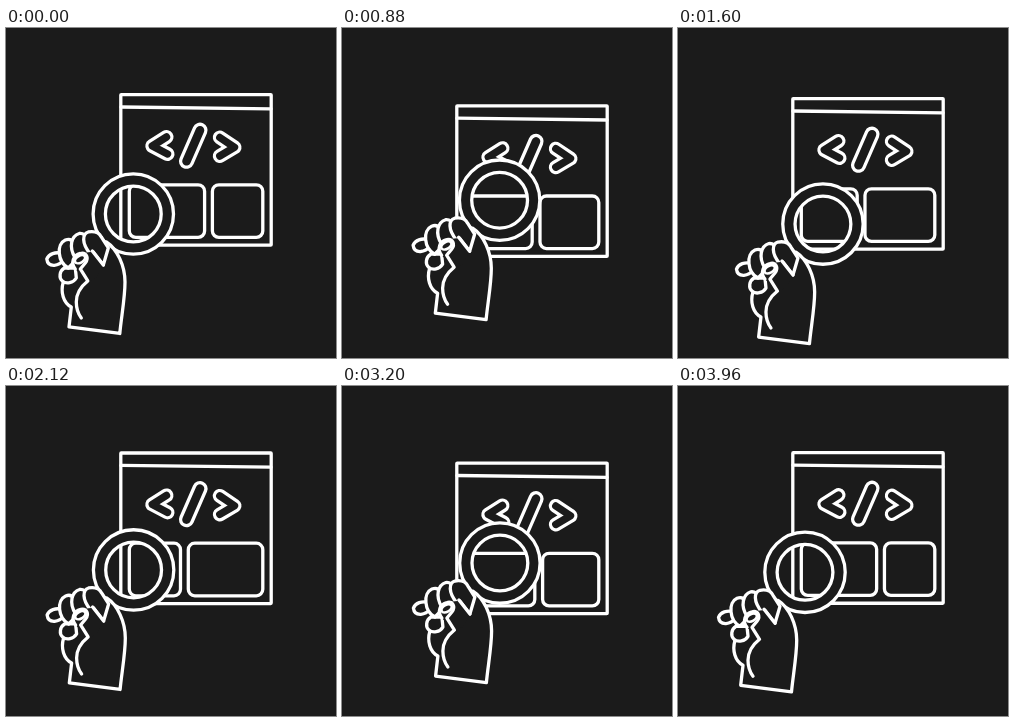
An HTML page with a canvas that plays this animation: 330 by 330 pixels, repeating every 4 s.

```html
<!DOCTYPE html>
<html lang="en">
<head>
<meta charset="utf-8">
<title>Code inspection</title>
<style>
  html, body { margin: 0; width: 100%; height: 100%; overflow: hidden; background: #1b1b1b; }
  canvas { display: block; width: 330px; height: 330px; }
</style>
</head>
<body>
<canvas id="stage"></canvas>
<script>
const SIZE = 330, LOOP = 4000, ORBIT = 2000;
const DARK = '#1b1b1b', LIGHT = '#fff', LINE = 3.3;
const canvas = document.getElementById('stage');
const ctx = canvas.getContext('2d');
const ratio = window.devicePixelRatio || 1;
canvas.width = canvas.height = SIZE * ratio;

// Keys are [time, value, ...]
const lensKeys = [
  [0, 127.3, 186], [120, 127.6, 184], [240, 131, 179.5], [520, 146.4, 164.4],
  [880, 157.6, 172.2], [1200, 157.9, 177], [1360, 155, 186], [1600, 145, 196],
  [1680, 140, 197.5], [1920, 127.5, 187]
];
const splitKeys = [
  [0, 206.4], [880, 198], [1600, 187], [2060, 182], [2520, 188.7], [3200, 200.6]
];

// Smooth closed curve through unevenly timed keys.
function sample(keys, period, time) {
  const n = keys.length;
  const at = i => {
    const turn = Math.floor(i / n), key = keys[i - turn * n];
    return [key[0] + turn * period, ...key.slice(1)];
  };
  const t = time % period;
  let i = n - 1;
  while (keys[i][0] > t) i--;
  const a = at(i - 1), b = at(i), c = at(i + 1), d = at(i + 2);
  const span = c[0] - b[0], u = (t - b[0]) / span;
  const u2 = u * u, u3 = u2 * u;
  return b.slice(1).map((p, k) => {
    const j = k + 1, q = c[j];
    const m = (q - a[j]) / (c[0] - a[0]) * span;
    const w = (d[j] - p) / (d[0] - b[0]) * span;
    return (2 * u3 - 3 * u2 + 1) * p + (u3 - 2 * u2 + u) * m +
           (3 * u2 - 2 * u3) * q + (u3 - u2) * w;
  });
}

function line(path, fill) {
  if (fill) {
    ctx.fillStyle = DARK;
    ctx.fill(path);
  }
  ctx.strokeStyle = LIGHT;
  ctx.lineWidth = LINE;
  ctx.stroke(path);
}

function box(x, y, w, h, r) {
  const p = new Path2D();
  p.roundRect(x, y, w, h, r);
  line(p);
}

// A thick rounded stroke shown as an outline.
function tube(d, width) {
  const p = new Path2D(d);
  for (const [color, w] of [[LIGHT, width], [DARK, width - 2 * LINE]]) {
    ctx.strokeStyle = color;
    ctx.lineWidth = w;
    ctx.stroke(p);
  }
}

function drawWindow(split) {
  box(114.8, 66.6, 150.4, 150.6, 0.5);
  line(new Path2D('M115 79L265 80.8'));
  tube('M160.5 109L146.3 118L161.5 126', 14);
  tube('M194 102.2L180.5 133.2', 15.2);
  tube('M213.8 109.5L228.5 119.3L213.8 128', 14);
  box(123.3, 156.8, split - 7.8 - 123.3, 52.6, 6.5);
  box(split, 156.8, 256.8 - split, 52.6, 6.5);
}

function circle(r) {
  const p = new Path2D();
  p.arc(127, 186, r, 0, Math.PI * 2);
  return p;
}

const rings = [circle(40.2), circle(27.9)];
const lens = new Path2D();
rings.forEach(p => lens.addPath(p));

const arm = new Path2D('M100 214C111 221 118.7 238 118.7 254C118.7 270 115 289 113.5 305.5L62.7 299L65 279C57 275 54 264 57 254L64 236L86 214Z');
const fingers = [
  'M56 225.5C49 223.5 42.5 226 40.5 231C41 235.5 44 237.5 48 237.3C52 237 55 235 57.5 232Z',
  'M58 240C53 243 52.5 250 56 253C60 256.5 67 255 70 250L69 240Z',
  'M62 240C51 234 50 216 59 212C63 210.5 66 212 67.5 215L74 228Z',
  'M69 230C62 219 65 208 73 205.5C77 205 80 208 82 212L86 224Z',
  'M84 226C75 215 76 206 82 204C88 203 93 205 95 209L102 220L97 237L87 224Z'
].map(d => new Path2D(d));
const thumb = new Path2D('M68 240C64 233 68 226 76 225C81 224 84 224 87 224L97 237L90 250L81.5 254Z');
const creases = new Path2D('M69 241C64 235 67 227 74 225.5C80 224 83 230 79 235L74 241L81.5 253C74 259 70 266 70 274C70 280 72 286 75 290');
const nail = new Path2D();
nail.ellipse(73.7, 231.3, 5.6, 3.4, -0.5, 0, Math.PI * 2);

function drawHand() {
  ctx.fillStyle = DARK;
  ctx.fill(lens, 'evenodd');
  rings.forEach(p => line(p));
  line(arm, true);
  fingers.forEach(p => line(p, true));
  ctx.fillStyle = DARK;
  ctx.fill(thumb);
  line(new Path2D('M86 223L97 237'));
  line(creases);
  ctx.lineWidth = 2.6;
  ctx.stroke(nail);
}

function shifted(x, y, draw) {
  ctx.save();
  ctx.translate(x, y);
  draw();
  ctx.restore();
}

function render(now) {
  const t = now % LOOP;
  const [x, y] = sample(lensKeys, ORBIT, t);
  const [split] = sample(splitKeys, LOOP, t);
  const bob = 5.8 * (1 - Math.cos(t / ORBIT * Math.PI * 2));
  ctx.setTransform(ratio, 0, 0, ratio, 0, 0);
  ctx.fillStyle = DARK;
  ctx.fillRect(0, 0, SIZE, SIZE);
  ctx.lineCap = ctx.lineJoin = 'round';
  shifted(0, bob, () => drawWindow(split));
  shifted(x - 127, y - 186, drawHand);
}

const start = performance.now();
function tick() {
  render(performance.now() - start);
  requestAnimationFrame(tick);
}
tick();
</script>
</body>
</html>
```
